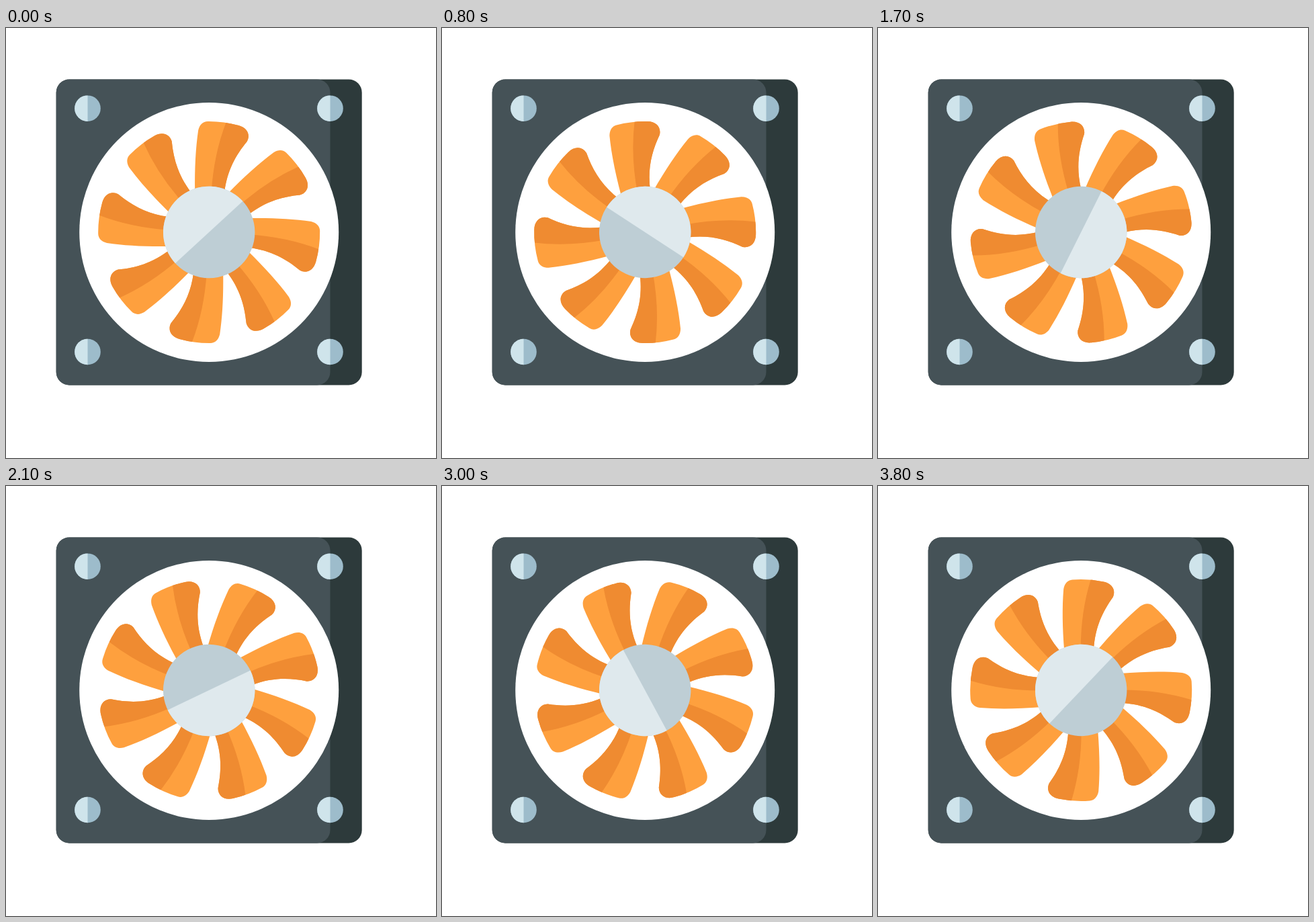
Recreate the animation shown at these times as an HTML page. Size 640 by 640 pixels, loop 3900 ms.

```html
<!DOCTYPE html>
<html lang="en">
<head>
<meta charset="utf-8">
<title>Cooling fan</title>
<style>
  html, body { margin: 0; width: 100%; height: 100%; overflow: hidden; background: #fff; }
  svg { display: block; width: 100vw; height: 100vh; }
</style>
</head>
<body>
<svg viewBox="0 0 640 640">
  <defs>
    <g id="bolt">
      <circle r="19.3" fill="#9dbccb"/>
      <path d="M0-19.3A19.3 19.3 0 0 0 0 19.3Z" fill="#cfe4eb"/>
    </g>
    <path id="shape" d="M-21-60C-21.5-95-20-125-16-152C-14-160-9-165-2-165A165 165 0 0 1 44-159C57-155.5 62-145 56.5-135C40-115 27-92 23-60Z"/>
    <clipPath id="edge"><use href="#shape"/></clipPath>
    <g id="blade">
      <use href="#shape" fill="#fea03e"/>
      <path d="M3.5-55V-60Q7-116 25.5-164L27-172H75V-55Z" fill="#ef8b31" clip-path="url(#edge)"/>
    </g>
  </defs>

  <rect x="74.7" y="76.5" width="455" height="455" rx="19.5" fill="#2d3a3b"/>
  <rect x="74.7" y="76.5" width="407.8" height="455" rx="19.5" fill="#455257"/>
  <use href="#bolt" x="121.5" y="119.7"/>
  <use href="#bolt" x="482.5" y="119.7"/>
  <use href="#bolt" x="121.5" y="482"/>
  <use href="#bolt" x="482.5" y="482"/>
  <circle cx="302.2" cy="304" r="193" fill="#fff"/>

  <g transform="translate(302.2 304)">
    <g id="rotor">
      <g id="blades"></g>
      <circle r="68.2" fill="#beced5"/>
      <path d="M-68.2 0A68.2 68.2 0 0 1 68.2 0Z" fill="#dfe9ed" transform="rotate(-42.6)"/>
    </g>
  </g>
</svg>
<script>
  const LOOP = 3900, STEP = 100, POSES = 95, BLADES = 8;
  const rotor = document.getElementById('rotor');
  const blades = document.getElementById('blades');

  for (let i = 0; i < BLADES; i++) {
    const blade = document.createElementNS('http://www.w3.org/2000/svg', 'use');
    blade.setAttribute('href', '#blade');
    blade.setAttribute('transform', `rotate(${i * 360 / BLADES})`);
    blades.appendChild(blade);
  }

  // Each step advances two or three poses; the last one stops short of a full turn.
  function draw(ms) {
    const step = Math.floor((ms % LOOP) / STEP);
    const pose = Math.min(Math.floor(step * 2.5), POSES - 1);
    rotor.setAttribute('transform', `rotate(${pose * 360 / POSES})`);
  }

  const start = performance.now();
  function tick() {
    draw(performance.now() - start);
    requestAnimationFrame(tick);
  }
  tick();
</script>
</body>
</html>
```
